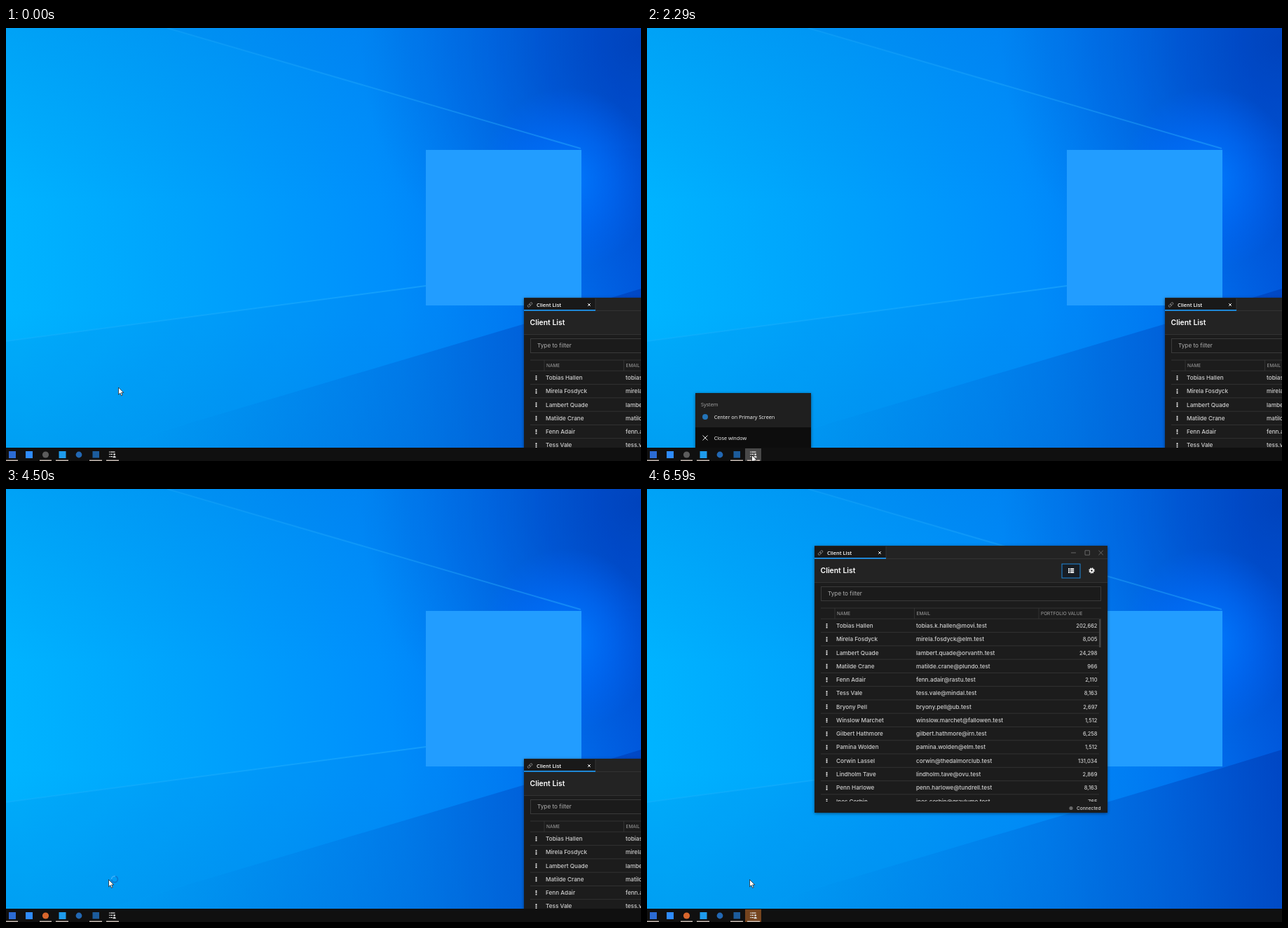
An HTML page for the animation above (6.73 s loop, 906 by 618 pixels).

```html
<!DOCTYPE html>
<html lang="en">
<head>
<meta charset="utf-8">
<title>Center window from the taskbar</title>
<style>
  html, body { margin: 0; width: 100%; height: 100%; overflow: hidden; background: #0080f0; }
  svg { display: block; width: 906px; height: 618px; }
  .app text { font: 500 8.2px Inter, sans-serif; fill: #d0d0d0; }
  .app .tab { font: 600 7.4px "Open Sans", sans-serif; fill: #fff; }
  .app .title { font-size: 10.4px; font-weight: 600; fill: #fff; }
  .app .head { font-size: 6.5px; font-weight: 400; fill: #a2a2a2; }
  .app .value { font-size: 7.5px; text-anchor: end; }
  .app .status { font-size: 6.6px; }
  .app .hint { font-weight: 400; fill: #b0b0b0; }
  .rule { stroke: #383838; stroke-width: .8; }
  #menu text { font: 7.25px "Open Sans", sans-serif; fill: #fff; }
  #menu .label { fill: #a8a8a8; }
</style>
</head>
<body>
<svg viewBox="0 0 906 618" xmlns="http://www.w3.org/2000/svg">
  <defs>
    <linearGradient id="sky" x1="0" y1=".55" x2="1" y2=".45">
      <stop offset="0" stop-color="#00b4ff"/>
      <stop offset=".3" stop-color="#00a2fc"/>
      <stop offset=".6" stop-color="#008ffc"/>
      <stop offset=".8" stop-color="#0078f4"/>
      <stop offset="1" stop-color="#0056dc"/>
    </linearGradient>
    <linearGradient id="dim" x1="0" y1="0" x2="0" y2="1">
      <stop offset="0" stop-color="#0070d8" stop-opacity=".22"/>
      <stop offset=".4" stop-color="#0070d8" stop-opacity="0"/>
      <stop offset=".65" stop-color="#0068d0" stop-opacity="0"/>
      <stop offset="1" stop-color="#0068d0" stop-opacity=".22"/>
    </linearGradient>
    <radialGradient id="corner" gradientUnits="userSpaceOnUse" cx="906" cy="20" r="400">
      <stop offset="0" stop-color="#0038b0" stop-opacity=".75"/>
      <stop offset=".35" stop-color="#0040bc" stop-opacity=".5"/>
      <stop offset="1" stop-color="#0058d0" stop-opacity="0"/>
    </radialGradient>
    <linearGradient id="floor">
      <stop offset="0" stop-color="#0060d0" stop-opacity="0"/>
      <stop offset=".5" stop-color="#0054c8" stop-opacity=".25"/>
      <stop offset="1" stop-color="#0038b0" stop-opacity=".55"/>
    </linearGradient>
    <radialGradient id="glow">
      <stop offset="0" stop-color="#007cff" stop-opacity=".95"/>
      <stop offset=".5" stop-color="#0070ff" stop-opacity=".55"/>
      <stop offset="1" stop-color="#0068ff" stop-opacity="0"/>
    </radialGradient>
    <linearGradient id="beam">
      <stop offset="0" stop-color="#30b8ff" stop-opacity=".2"/>
      <stop offset="1" stop-color="#30b8ff" stop-opacity=".4"/>
    </linearGradient>
    <filter id="shadow" x="-10%" y="-10%" width="120%" height="120%">
      <feDropShadow dx="0" dy="1" stdDeviation="2.2" flood-opacity=".5"/>
    </filter>
    <clipPath id="list"><rect x="239" y="186" width="418" height="260"/></clipPath>
    <clipPath id="desk"><rect width="906" height="600"/></clipPath>
  </defs>

  <rect width="906" height="618" fill="url(#sky)"/>
  <rect width="906" height="618" fill="url(#dim)"/>
  <rect width="906" height="420" fill="url(#corner)"/>
  <path d="M230 0H906V172H820Z" fill="#0060d8" opacity=".08"/>
  <path d="M0 447L599 368L821 398L140 600H0Z" fill="#0070d8" opacity=".12"/>
  <path d="M821 398L906 372V618H80Z" fill="url(#floor)"/>
  <ellipse cx="800" cy="215" rx="125" ry="130" fill="url(#glow)"/>
  <g fill="none" stroke="url(#beam)" stroke-width="2">
    <path d="M230 0L820 172"/>
    <path d="M0 447L599 368"/>
  </g>
  <rect x="599" y="174" width="222" height="222" fill="#229dff"/>

  <g clip-path="url(#desk)">
    <g id="window" class="app">
      <rect x="239" y="81" width="418" height="381" fill="#1e1e1e" filter="url(#shadow)"/>
      <path d="M239 81H657V133H239Z" fill="#232323"/>
      <path d="M239 82H341V99H239Z" fill="#191919"/>
      <path d="M341 82V99M341 99.5H657M239 133.5H657" class="rule"/>
      <path d="M239 98.8H341" stroke="#1e96f0" stroke-width="1.8"/>
      <g fill="none" stroke="#888" stroke-width=".9" transform="translate(247.5 91) rotate(-45)">
        <rect x="-4" y="-1.4" width="4.4" height="2.8" rx="1.4"/>
        <rect x="-.4" y="-1.4" width="4.4" height="2.8" rx="1.4"/>
      </g>
      <text class="tab" x="257" y="93.7">Client List</text>
      <path d="M330.2 89.2l3.6 3.6m0-3.6l-3.6 3.6" stroke="#fff"/>
      <path d="M605 91h7M625 87.8h6.4v6.4H625ZM644.4 87.8l6.4 6.4m0-6.4l-6.4 6.4" fill="none" stroke="#777" stroke-width=".8"/>

      <text class="title" x="247.5" y="119.5">Client List</text>
      <rect x="592" y="107" width="26" height="20" fill="#171d24" stroke="#1e88dc"/>
      <path d="M601 114.2h2m.8 0h5.4M601 116.7h2m.8 0h5.4M601 119.2h2m.8 0h5.4" stroke="#fff" stroke-width="1.8"/>
      <circle cx="634.5" cy="116.5" r="3.5" fill="none" stroke="#fff" stroke-width="1.4" stroke-dasharray="1.6 1.149"/>
      <circle cx="634.5" cy="116.5" r="2.2" fill="none" stroke="#fff" stroke-width="1.7"/>

      <rect x="248.5" y="139.5" width="399" height="20" fill="#1b1b1b" stroke="#3a3a3a"/>
      <text class="hint" x="258" y="152.3">Type to filter</text>
      <path d="M248 170H648M248 185.3H648M268 170V185M381.5 170V185M559 170V185" class="rule"/>
      <text class="head" x="271" y="180">NAME</text>
      <text class="head" x="384.5" y="180">EMAIL</text>
      <text class="head" x="562" y="180">PORTFOLIO VALUE</text>
      <g id="rows" clip-path="url(#list)"></g>
      <rect x="645" y="186" width="2.6" height="40" fill="#444"/>
      <circle cx="605" cy="455.5" r="2.6" fill="#6a6a6a"/>
      <text class="status" x="613" y="457.8">Connected</text>
    </g>

    <g id="menu">
      <rect x="69" y="521" width="165" height="100" fill="#111" filter="url(#shadow)"/>
      <rect x="69" y="521" width="165" height="49" fill="#1f1f1f"/>
      <rect id="hoverClose" x="72" y="575.5" width="160" height="19" fill="#3a3a3a"/>
      <g id="hoverCenter">
        <rect id="pill" x="72.5" y="546" width="159" height="18.5" fill="#414141"/>
        <path d="M217.5 555h3m0-3v6m0-4.8h4.2v3.6h-4.2m4.2-4.8v6m0-3h2" fill="none" stroke="#ddd" stroke-width=".9"/>
      </g>
      <text class="label" x="77" y="539.6">System</text>
      <g id="centerItem">
        <circle cx="83" cy="555" r="4" fill="#2474b8"/>
        <text x="95.7" y="558">Center on Primary Screen</text>
      </g>
      <path d="M79.5 581.5l7 7m0-7l-7 7" stroke="#fff" stroke-width=".9"/>
      <text x="95.7" y="587.6">Close window</text>
    </g>
  </g>

  <rect y="599" width="906" height="19" fill="#101010"/>
  <rect id="button" x="140" y="600" width="23" height="18" fill="#fff"/>
  <rect id="flash" x="140" y="600" width="23" height="18" fill="#834c20"/>
  <path d="M0 617.2H17M48 617.2H65M71 617.2H89M119 617.2H137M143 617.2H161" stroke="#c8bcb4" stroke-width="1.4"/>
  <rect x="4" y="604" width="10" height="10" fill="#2c6cd4"/>
  <rect x="28" y="604" width="10" height="10" fill="#2f8cff"/>
  <circle id="launcher" cx="56.5" cy="609" r="4.6"/>
  <rect x="75.5" y="604" width="10" height="10" fill="#1e9bec"/>
  <circle cx="104" cy="609" r="4.4" fill="#2268b4"/>
  <rect x="123.5" y="604" width="9.5" height="9.5" fill="#1c5c9c"/>
  <g stroke="#ddd" stroke-width="1.2">
    <path d="M147 605.2h1.4m.7 0h6.4M147 608.4h1.4m.7 0h3M147 611.6h1.4m.7 0h3"/>
    <circle cx="154.6" cy="608.6" r="1.4" fill="#ddd" stroke="none"/>
    <path d="M152.4 613.2q0-2.4 2.2-2.4t2.2 2.4Z" fill="#ddd" stroke="none"/>
  </g>

  <circle id="click" cx="146.3" cy="556.5" r="8" fill="#d4bc00"/>
  <g id="busy" fill="none" stroke-width="1.8">
    <circle cx="155" cy="557" r="4.4" stroke="#0b78d0"/>
    <circle id="busyArc" cx="155" cy="557" r="4.4" stroke="#36b4ff" stroke-dasharray="8 19.65"/>
  </g>
  <path id="cursor" d="M0 0V10.2L2.4 8L4 11.8L5.7 11L4.1 7.4H7.3Z" fill="#fff" stroke="#111" stroke-width=".7"/>
</svg>
<script>
const LOOP = 6730, STEP = 68.5, FIRST_MOVE = 450;
const $ = id => document.getElementById(id);

// name | mail domain or full address | portfolio value
const clients = `Tobias Hallen|tobias.k.hallen@movi.test|202,662
Mirela Fosdyck|elm.test|8,005
Lambert Quade|orvanth.test|24,298
Matilde Crane|plundo.test|966
Fenn Adair|rastu.test|2,110
Tess Vale|mindal.test|8,163
Bryony Pell|ub.test|2,697
Winslow Marchet|fallowen.test|1,512
Gilbert Hathmore|irn.test|6,258
Pamina Wolden|elm.test|1,512
Corwin Lassel|corwin@thedalmorclub.test|131,034
Lindholm Tave|ovu.test|2,869
Penn Harlowe|tundrell.test|8,163
Ines Corbin|gravlume.test|765`.split("\n").map(line => line.split("|"));

$("rows").innerHTML = clients.map(([name, mail, value], i) => {
  const y = 195 + i * 19.27;
  const address = mail.includes("@") ? mail : `${name.toLowerCase().replace(" ", ".")}@${mail}`;
  return `<path d="M256.5 ${y - 3}v6.4" stroke="#fff" stroke-width="1.8" stroke-dasharray="1.6 .8"/>
    <text x="270" y="${y + 3}">${name}</text>
    <text x="384" y="${y + 3}">${address}</text>
    <text class="value" x="642.5" y="${y + 3}">${value}</text>
    <path class="rule" d="M248 ${y + 9.6}H645"/>`;
}).join("");

// time, x, y of the pointer tip
const path = [
  [390, 160.5, 513], [1070, 149.5, 590], [1400, 149.5, 609.5], [2300, 149.5, 609.5],
  [2570, 149, 583], [2710, 148.5, 572.5], [3270, 146.5, 557.5]
];

const ramp = (t, from, to) => Math.min(1, Math.max(0, (t - from) / (to - from)));
const easeOut = p => 1 - (1 - p) ** 3;
const show = (id, opacity) => $(id).setAttribute("opacity", +opacity);
const move = (id, x, y) => $(id).setAttribute("transform", `translate(${x} ${y})`);

function pointer(t) {
  const next = path.findIndex(key => key[0] > t);
  if (next === 0) return path[0].slice(1);
  if (next < 0) return path.at(-1).slice(1);
  const [t0, x0, y0] = path[next - 1], [t1, x1, y1] = path[next];
  let p = ramp(t, t0, t1);
  if (next === 1) p = p * p * (3 - 2 * p);
  return [x0 + (x1 - x0) * p, y0 + (y1 - y0) * p];
}

function flashLevel(t) {
  return [4570, 5505, 6485].reduce((level, on) =>
    Math.max(level, ramp(t, on, on + 70) * (1 - ramp(t, on + 260, on + 480))), 0);
}

function draw() {
  const now = performance.now() % LOOP;
  // Time advances in even steps.
  const t = now < FIRST_MOVE ? 0
    : FIRST_MOVE + Math.floor((now - FIRST_MOVE) / STEP + .12) * STEP;
  const [x, y] = pointer(t);
  const menuOpen = t > 1940 && t < 3760;
  const pressed = t > 3460 && t < 3670;

  move("cursor", x, y);
  move("window", ...(t < 4550 ? [500, 304] : [0, 0]));

  const rise = easeOut(ramp(t, 1925, 2200));
  move("menu", 0, 16 * (1 - rise));
  show("menu", menuOpen ? .69 + .31 * ramp(t, 1925, 2090) : 0);
  show("hoverCenter", y > 546 && y < 565);
  show("hoverClose", y > 575.5 && y < 594.5);
  $("pill").setAttribute("fill", pressed ? "#484848" : "#3a3a3a");
  $("centerItem").setAttribute("transform", pressed ? "translate(3 11.1) scale(.98)" : "");

  show("button", t > 3760 ? 0 : t > 1800 ? .24 : .16 * ramp(t, 1130, 1340));
  show("flash", flashLevel(t));
  $("launcher").setAttribute("fill", t < 3950 ? "#5c5c5c" : "#d8662c");

  show("click", t > 3460 && t < 3800 ? .9 * (1 - ramp(t, 3620, 3800)) : 0);
  show("busy", t > 4070 && t < 4550);
  $("busyArc").setAttribute("transform", `rotate(${t * .36 % 360} 155 557)`);
  requestAnimationFrame(draw);
}
draw();
</script>
</body>
</html>
```
